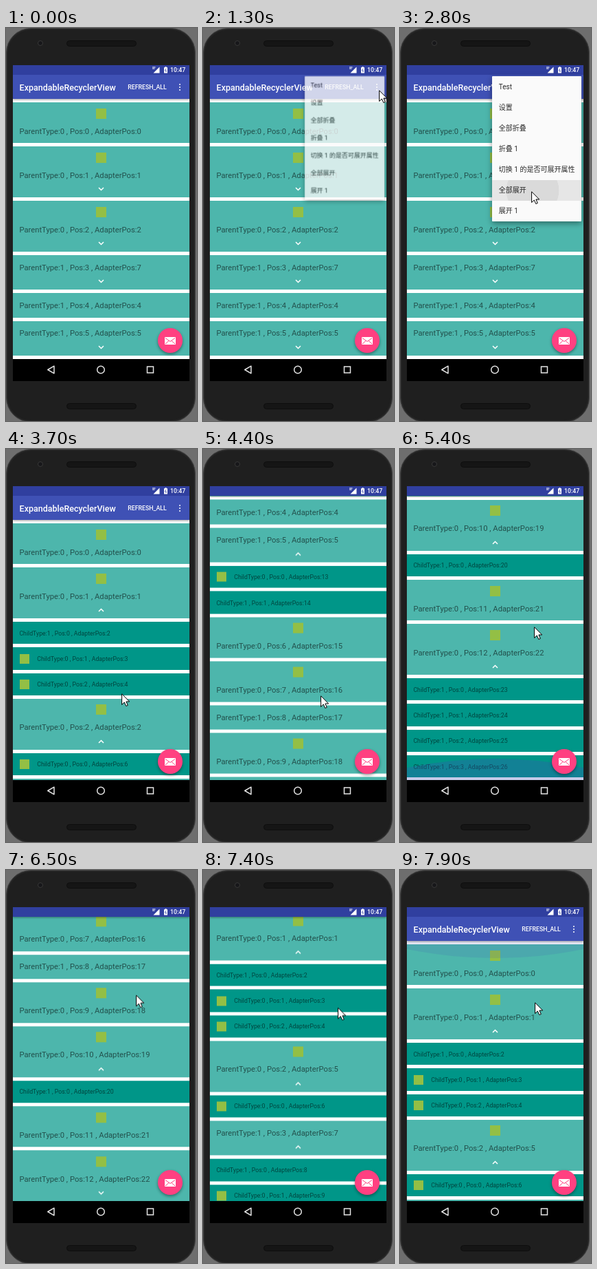
An HTML page for the animation above (8 s loop, 278 by 571 pixels).

```html
<!DOCTYPE html>
<html lang="en">
<head>
<meta charset="utf-8">
<title>Expandable list</title>
<style>
html, body { margin: 0; width: 100%; height: 100%; overflow: hidden; background: #6e6e6e; }
body { position: relative; font-family: Roboto, "Noto Sans CJK SC", "Noto Sans CJK", sans-serif; }
body * { box-sizing: border-box; }
div, svg, i, b { position: absolute; display: block; }
span { white-space: pre; }

.phone { left: 0; top: 0; width: 276px; height: 573px; border-radius: 36px; background: #1f1f1f; border: 1.5px solid #454545; box-shadow: inset 0 0 3px #3a3a3a; }
.slot { left: 88px; width: 102px; height: 9px; border-radius: 5px; background: #151515; border: 1px solid #0e0e0e; }
.lens { left: 46px; top: 18px; width: 8px; height: 8px; border-radius: 50%; background: #17171a; border: 1px solid #383838; }

.screen { left: 10px; top: 54px; width: 257px; height: 459px; overflow: hidden; background: #fff; }
.status { width: 257px; height: 14px; background: #303f9f; color: #fff; }
.status span { position: absolute; left: 229px; font: 500 8.75px/15px Roboto, sans-serif; }
.bar { top: 14px; width: 257px; height: 35px; background: #3f51b5; color: #fff; box-shadow: 0 1px 3px rgba(0,0,0,.4); animation: bar 8s linear infinite; }
.bar span { position: absolute; left: 9.6px; font: 500 12.5px/37px Roboto, sans-serif; }
.bar span + span { left: 167.3px; font-size: 8.75px; }
.bar i { left: 242px; width: 2.4px; height: 2.4px; border-radius: 50%; background: #fff; }
.view { top: 14px; width: 257px; height: 413px; overflow: hidden; background: #fff; }
.list { top: 40px; width: 257px; animation: scroll 8s linear infinite; }

.row, .kids, .kid { position: relative; width: 257px; }
.row { background: #4db6ac; border-bottom: 5px solid #fff; color: rgba(0,0,0,.56); font-size: 11.25px; }
.row span { position: absolute; left: 9.4px; line-height: 20px; }
.row .logo { left: 120.5px; top: 8.5px; width: 15px; height: 15px; }
.logo { background: #93bf45; }
.kids { height: 0; overflow: hidden; animation: grow 8s linear infinite, show 8s linear infinite; }
.kid { height: 37.3px; background: #009688; border-bottom: 5px solid #fff; color: rgba(0,0,0,.54); font-size: 8.75px; }
.kid span { position: absolute; left: 9.4px; top: .5px; line-height: 33px; }
.kid .logo { left: 10px; top: 9.5px; width: 14px; height: 14px; }
.kid .logo + span { left: 35.2px; }
.arrow { left: 123.5px; width: 9px; height: 6px; fill: none; stroke: #fff; stroke-width: 1.5; animation: flip 8s linear infinite; }
.last .kids { animation-name: growshut, showhide; }
.last .arrow { animation-name: flipback; }
.row .old { animation: old 8s step-end infinite; }
.row .new { animation: new 8s step-end infinite; }

.glow { left: -511.5px; width: 1280px; height: 1280px; border-radius: 50%; background: #3f51b5; opacity: 0; }
.glow.end { top: 413px; animation: end 8s linear infinite; }
.glow.start { top: -1280px; animation: start 8s linear infinite; }
.edge { top: 35px; width: 257px; height: 378px; overflow: hidden; }

.fab { left: 211px; top: 382px; width: 36px; height: 36px; border-radius: 50%; background: #ff4081; box-shadow: 0 2px 4px rgba(0,0,0,.4); }
.fab svg { left: 10px; top: 12.5px; }
.nav { top: 427px; width: 257px; height: 32px; background: #000; }

.menu { left: 124px; top: 16px; width: 130px; height: 211px; background: #fafafa; overflow: hidden; color: rgba(0,0,0,.84); border-radius: 1px; }
.pop { left: 0; top: 0; width: 257px; height: 427px; opacity: 0; transform-origin: 254px 16px; animation: pop 8s linear infinite; }
.shade { left: 124px; top: 16px; width: 130px; height: 211px; box-shadow: 0 3px 8px rgba(0,0,0,.4); }
.menu span { position: absolute; left: 9.8px; font-size: 10px; line-height: 30px; }
.press { top: 151px; width: 130px; height: 30px; background: #e6e6e6; overflow: hidden; opacity: 0; animation: press 8s linear infinite; }
.press i { left: 21px; top: -23px; width: 76px; height: 76px; border-radius: 50%; background: #dadada; animation: ripple 8s linear infinite; }

.cursor { left: -1px; top: -.5px; width: 14px; height: 21px; animation: move 8s linear infinite, appear 8s step-end infinite; }

@keyframes scroll {
  0%, 47% { transform: translateY(0); }
  48% { transform: translateY(-40px); }
  49% { transform: translateY(-120px); }
  50% { transform: translateY(-215px); }
  51% { transform: translateY(-310px); }
  52% { transform: translateY(-395px); }
  53% { transform: translateY(-465px); }
  54% { transform: translateY(-525px); }
  55% { transform: translateY(-572px); }
  56% { transform: translateY(-605px); }
  57% { transform: translateY(-632px); }
  58% { transform: translateY(-690px); }
  59% { transform: translateY(-765px); }
  60% { transform: translateY(-832px); }
  62% { transform: translateY(-920px); }
  64% { transform: translateY(-968px); }
  64.6% { transform: translateY(-975px); }
  75.25% { transform: translateY(-975px); animation-timing-function: ease-in-out; }
  78.25%, 80% { transform: translateY(-826px); }
  81.25% { transform: translateY(-822px); }
  82% { transform: translateY(-805px); }
  83% { transform: translateY(-755px); }
  84% { transform: translateY(-685px); }
  86% { transform: translateY(-515px); }
  88% { transform: translateY(-370px); }
  90% { transform: translateY(-245px); }
  92% { transform: translateY(-138px); }
  94.25% { transform: translateY(-35px); }
  95.25%, 100% { transform: translateY(0); }
}
@keyframes bar {
  0%, 47%, 95.25%, 100% { transform: translateY(0); }
  47.875%, 94.25% { transform: translateY(-35px); }
}
@keyframes grow {
  0%, 35.8% { height: 0; animation-timing-function: ease-in-out; }
  37.6%, 100% { height: calc(var(--n) * 37.3px); }
}
@keyframes growshut {
  0%, 35.8% { height: 0; }
  37.6%, 75.25% { height: calc(var(--n) * 37.3px); animation-timing-function: ease-in-out; }
  78.25%, 100% { height: 0; }
}
@keyframes show { 0%, 37% { opacity: 0; } 38.7%, 100% { opacity: 1; } }
@keyframes showhide { 0%, 37% { opacity: 0; } 38.7%, 73.75% { opacity: 1; } 75.25%, 100% { opacity: 0; } }
@keyframes flip { 0%, 35.8% { transform: none; } 38.3%, 100% { transform: rotate(180deg); } }
@keyframes flipback { 0%, 35.8% { transform: none; } 38.3%, 73.75% { transform: rotate(180deg); } 76.25%, 100% { transform: none; } }
@keyframes old { 0% { opacity: 1; } 65%, 100% { opacity: 0; } }
@keyframes new { 0% { opacity: 0; } 65%, 100% { opacity: 1; } }
@keyframes end {
  0%, 64.4% { opacity: 0; transform: translateY(0); }
  66%, 67.5% { opacity: .3; transform: translateY(-31px); }
  71.3%, 100% { opacity: 0; transform: translateY(-8px); }
}
@keyframes start {
  0%, 95.2% { opacity: 0; transform: translateY(0); }
  96.8% { opacity: .3; transform: translateY(29px); }
  98.75% { opacity: .13; transform: translateY(25px); }
  100% { opacity: .08; transform: translateY(22px); }
}
@keyframes pop {
  0%, 14.4% { opacity: 0; transform: scale(.5, .3); animation-timing-function: ease-out; }
  17.5%, 35.4% { opacity: 1; transform: none; }
  36.8%, 100% { opacity: 0; transform: none; }
}
@keyframes press { 0%, 33.9% { opacity: 0; } 34.7%, 37% { opacity: 1; } 37.1%, 100% { opacity: 0; } }
@keyframes ripple { 0%, 33.9% { transform: scale(.2); } 35% { transform: none; } 37%, 100% { transform: scale(2.2); } }
@keyframes appear { 0% { opacity: 0; } 1.2%, 100% { opacity: 1; } }
@keyframes move {
  0%, 1.2% { transform: translate(221px, 149px); }
  5% { transform: translate(237px, 120px); }
  8.7%, 16.5% { transform: translate(257px, 90px); }
  21% { transform: translate(226px, 147px); }
  25% { transform: translate(199px, 199px); }
  30%, 41.3% { transform: translate(192px, 237px); }
  43.5% { transform: translate(184px, 290px); }
  46%, 47% { transform: translate(169px, 355px); }
  48% { transform: translate(169px, 315px); }
  50% { transform: translate(172px, 215px); }
  51% { transform: translate(173px, 205px); }
  54.5%, 57% { transform: translate(172px, 358px); }
  58% { transform: translate(175px, 305px); }
  59.5% { transform: translate(188px, 235px); }
  65%, 75% { transform: translate(196px, 258px); }
  79.5% { transform: translate(189px, 168px); }
  81.25% { transform: translate(190px, 181px); }
  82% { transform: translate(191px, 198px); }
  84% { transform: translate(195px, 280px); }
  86% { transform: translate(197px, 300px); }
  93%, 100% { transform: translate(197px, 192px); }
}
</style>
</head>
<body>
<div class="phone"></div>
<div class="lens"></div>
<div class="slot" style="top:18px"></div>
<div class="slot" style="top:545px"></div>

<div class="screen">
  <div class="view">
    <div class="list"></div>
    <div class="glow end"></div>
    <div class="edge"><div class="glow start"></div></div>
  </div>
  <div class="bar">
    <span>ExpandableRecyclerView</span><span>REFRESH_ALL</span>
    <i style="top:13px"></i><i style="top:17px"></i><i style="top:21px"></i>
  </div>
  <div class="status">
    <svg width="257" height="14" fill="#fff">
      <path d="M213.500 2.500V11.500H204.500Z"/>
      <path d="M203 3h4.500M203 5h3.500" stroke="#fff"/>
      <path d="M221.500 2.200h2v1h1.500V11.500h-5V3.200h1.500Z"/>
      <path d="M223 5l-1.500 3h2l-1 2" fill="none" stroke="#303f9f" stroke-width=".8"/>
    </svg>
    <span>10:47</span>
  </div>
  <div class="fab">
    <svg width="16" height="11">
      <rect width="16" height="11" rx="1" fill="#fff"/>
      <path d="M1 1.500L8 6.500L15 1.500M1 10L6 5.500M15 10L10 5.500" fill="none" stroke="#ff4081"/>
    </svg>
  </div>
  <div class="nav">
    <svg width="257" height="32" fill="none" stroke="#e4e4e4" stroke-width="1.5">
      <path d="M60 10.200V20.800L50.800 15.500Z" stroke-linejoin="round"/>
      <circle cx="128" cy="15.500" r="5.300"/>
      <rect x="195.500" y="11" width="9" height="9"/>
    </svg>
  </div>
  <div class="pop">
    <div class="shade"></div>
    <div class="menu"><div class="press"><i></i></div></div>
  </div>
</div>

<svg class="cursor" viewBox="0 0 14 21">
  <path d="M.6.8V16.500L4.300 13L6.800 18.500L9.300 17.400L6.900 12H11.700Z" fill="#fff" stroke="#000"/>
</svg>

<script>
// [type, adapter position, child types, adapter position before rebinding]
const groups = [
  [0, 0, []], [0, 1, [1, 0, 0]], [0, 5, [0], 2], [1, 7, [1, 0, 1]],
  [1, 11, [], 4], [1, 12, [0, 1], 5], [0, 15, []], [0, 16, []],
  [1, 17, []], [0, 18, []], [0, 19, [1]], [0, 21, []], [0, 22, [1, 1, 1, 1]]
];
const logo = '<b class="logo"></b>';
const label = (kind, type, pos, at) => `${kind}Type:${type} , Pos:${pos} , AdapterPos:${at}`;

function parent([type, at, kids, before], pos) {
  const height = (type ? 40.3 : 64) + (kids.length ? 15 : 0);
  const top = type ? 8.5 : 32.5;
  const text = (n, cls) => `<span class="${cls}" style="top:${top}px">${label('Parent', type, pos, n)}</span>`;
  const texts = before === undefined ? text(at, '') : text(before, 'old') + text(at, 'new');
  const arrow = kids.length
    ? `<svg class="arrow" style="top:${top + 26.5}px"><path d="M1 1L4.500 4.500L8 1"/></svg>` : '';
  const rows = kids.map((k, i) =>
    `<div class="kid">${k ? '' : logo}<span>${label('Child', k, i, at + i + 1)}</span></div>`).join('');
  return `<section class="${pos === groups.length - 1 ? 'last' : ''}">
    <div class="row" style="height:${height}px">${type ? '' : logo}${texts}${arrow}</div>
    <div class="kids" style="--n:${kids.length}">${rows}</div></section>`;
}
document.querySelector('.list').innerHTML = groups.map(parent).join('');

const items = ['Test', '设置', '全部折叠', '折叠 1', '切换 1 的是否可展开属性', '全部展开', '展开 1'];
document.querySelector('.menu').insertAdjacentHTML('beforeend',
  items.map((s, i) => `<span lang="zh-CN" style="top:${i * 30 + 1}px">${s}</span>`).join(''));
</script>
</body>
</html>
```
